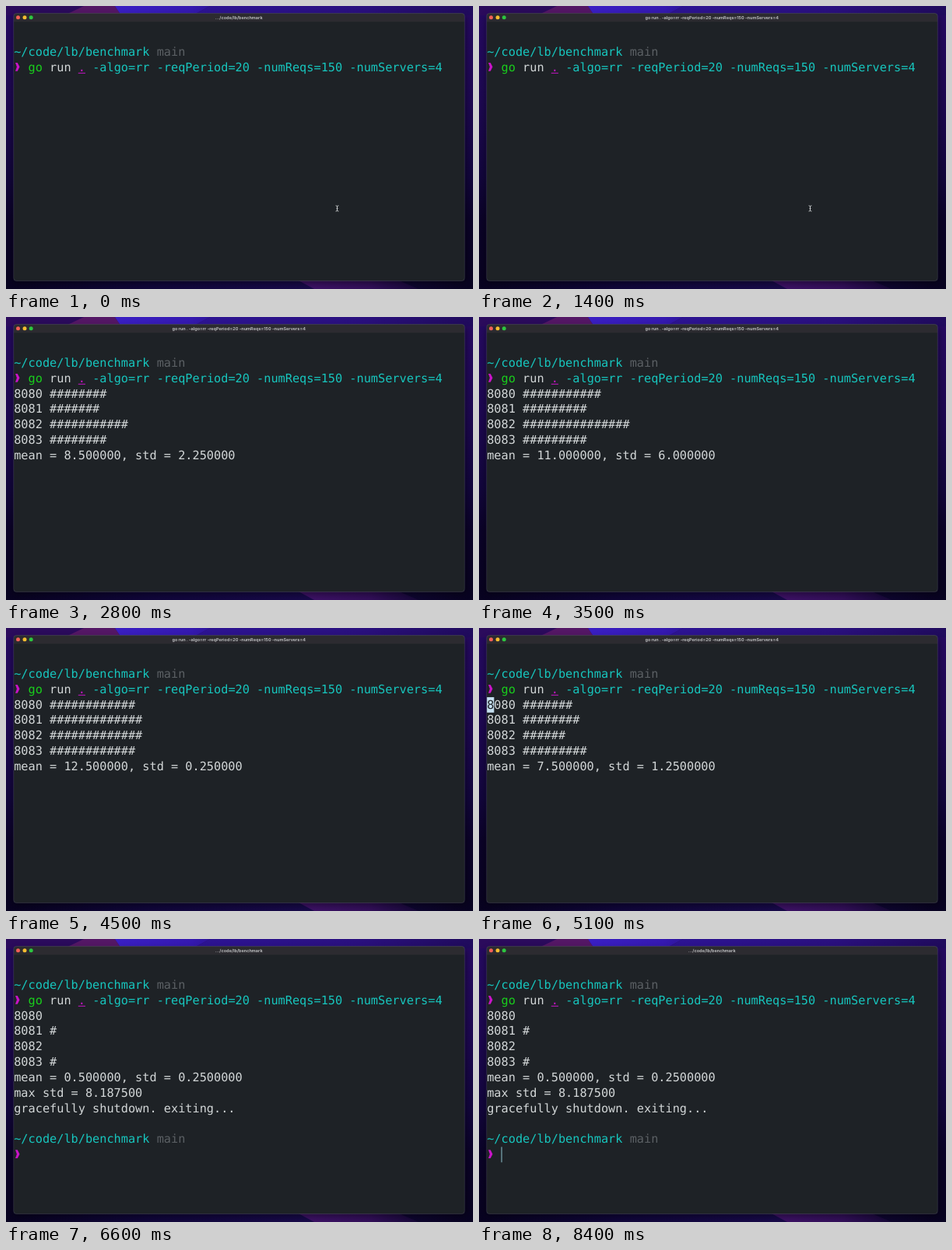
These frames come from a looping animation (600 px wide and 364 px high, 8500 ms). An HTML page:

```html
<!DOCTYPE html>
<html lang="en">
<head>
<meta charset="utf-8">
<title>Terminal</title>
<style>
  html, body { margin: 0; width: 100%; height: 100%; overflow: hidden; background: #0d0630; }
  svg { display: block; }
  text { white-space: pre; text-rendering: geometricPrecision; }
  .term { font: 15.24px "DejaVu Sans Mono", monospace; fill: #d3d7d8; }
  .bar { font: 700 5.5px Inter, sans-serif; fill: #b9babc; text-anchor: middle; }
  .term .cyan { fill: #17c6be; }
  .term .dim { fill: #5b6064; }
  .term .green { fill: #19cf1c; }
  .term .pink { fill: #c814c8; }
  .term .dark { fill: #1e2226; }
</style>
</head>
<body>
<svg id="stage" width="600" height="364" viewBox="0 0 600 364">
  <defs>
    <linearGradient id="sky" x1="0" y1="0" x2="0" y2="1">
      <stop offset="0" stop-color="#260a62"/>
      <stop offset=".35" stop-color="#1d0850"/>
      <stop offset=".6" stop-color="#12063c"/>
      <stop offset=".75" stop-color="#0b0328"/>
      <stop offset="1" stop-color="#08031f"/>
    </linearGradient>
    <linearGradient id="glow" x1="0" x2="1">
      <stop offset="0" stop-color="#3a1fc4"/>
      <stop offset=".8" stop-color="#3519b0"/>
      <stop offset="1" stop-color="#2f169c"/>
    </linearGradient>
    <linearGradient id="far" x1="0" x2="1">
      <stop offset="0" stop-color="#2d1494"/>
      <stop offset=".6" stop-color="#2a107e"/>
      <stop offset="1" stop-color="#200b5c"/>
    </linearGradient>
    <linearGradient id="floor" x1="0" x2="1">
      <stop offset="0" stop-color="#080320"/>
      <stop offset=".3" stop-color="#10063a"/>
      <stop offset=".65" stop-color="#180a4a"/>
      <stop offset="1" stop-color="#080320"/>
    </linearGradient>
    <linearGradient id="plum" x1="0" x2="1">
      <stop offset="0" stop-color="#3f1268"/>
      <stop offset=".6" stop-color="#330f5a"/>
      <stop offset="1" stop-color="#160838"/>
    </linearGradient>
    <filter id="blur" x="-10%" y="-10%" width="120%" height="120%">
      <feGaussianBlur stdDeviation="4"/>
    </filter>
    <clipPath id="frame"><rect x="10" y="9.5" width="579" height="344" rx="3.5"/></clipPath>
  </defs>
  <rect width="600" height="364" fill="url(#sky)"/>
  <path d="M0 0H100L75 12H0z" fill="#2b0b5c"/>
  <path d="M100 0H140L148 12H75z" fill="#541765"/>
  <path d="M140 0H262L240 12H148z" fill="url(#glow)"/>
  <path d="M262 0H600V12H240z" fill="url(#far)"/>
  <path d="M0 351H600V364H0z" fill="url(#floor)"/>
  <path d="M372 351H500L530 364H396z" fill="url(#plum)"/>
  <rect x="9" y="13" width="582" height="344" rx="5" opacity=".4" filter="url(#blur)"/>
  <g clip-path="url(#frame)">
    <rect x="10" y="9" width="579" height="345" fill="#1e2226"/>
    <rect x="10" y="9" width="579" height="11.3" fill="#2c2b30"/>
  </g>
  <rect x="9.7" y="9.4" width="579.6" height="344.2" rx="3.8" fill="none" stroke="#777a86" stroke-opacity=".42" stroke-width=".7"/>
  <circle cx="15.5" cy="14.7" r="2.5" fill="#f45f57"/>
  <circle cx="24" cy="14.7" r="2.5" fill="#f5bd30"/>
  <circle cx="32.2" cy="14.7" r="2.5" fill="#2cc640"/>
  <text id="title" class="bar" x="299.2" y="16.5"></text>
  <g id="term" class="term"></g>
  <path id="mouse" d="M423.6 256.8q1.9 0 1.9 1.1v5q0 1.1-1.9 1.1M427.4 256.8q-1.9 0-1.9 1.1v5q0 1.1 1.9 1.1M424.5 260.4h2" fill="none" stroke="#c9cccd" stroke-width=".9"/>
</svg>
<script>
const LOOP = 8500, BLINK = 500, TICK = 100;
const ENTER = 900, START = 1500, EXIT = 6400, HIDE_MOUSE = 2700;
const COL = 9.175, ROW = 19.83;
const FLAGS = '-algo=rr -reqPeriod=20 -numReqs=150 -numServers=4';
const IDLE = '.../code/lb/benchmark', BUSY = 'go run . ' + FLAGS;

// time, then open requests on each of the four servers
const LOAD = [
  [1500, 0, 0, 0, 0],
  [2000, 4, 7, 6, 6],
  [2800, 8, 7, 11, 8],
  [3500, 11, 9, 15, 9],
  [3800, 11, 8, 16, 12],
  [4500, 12, 13, 13, 12],
  [5100, 7, 8, 6, 9],
  [5700, 3, 3, 2, 5],
  [6300, 0, 1, 0, 1]
];

const byId = id => document.getElementById(id);
const term = byId('term'), title = byId('title'), mouse = byId('mouse');
const colX = c => 10.2 + c * COL;
const baseY = r => 64 + r * ROW;
const cellY = r => 49.3 + r * ROW;

function add(parent, tag, attrs) {
  const el = document.createElementNS('http://www.w3.org/2000/svg', tag);
  for (const k in attrs) el.setAttribute(k, attrs[k]);
  return parent.appendChild(el);
}

function write(parent, row, col, str, cls = '') {
  const el = add(parent, 'text', { x: colX(col), y: baseY(row), class: cls });
  el.textContent = str;
  return el;
}

function prompt(parent, row) {
  write(parent, row, 0, '~/code/lb/benchmark', 'cyan');
  write(parent, row, 20, 'main', 'dim');
  add(parent, 'path', {
    d: 'M12 0h2.8l2.7 5.3l-2.7 5.3h-2.8l1.9-5.3z',
    transform: `translate(0 ${baseY(row + 1) - 10.8})`, class: 'pink'
  });
}

const show = (el, on) => el.setAttribute('visibility', on ? 'visible' : 'hidden');
const setText = (el, s) => { if (el.textContent !== s) el.textContent = s; };

prompt(term, 0);
write(term, 1, 2, 'go', 'green');
write(term, 1, 5, 'run');
write(term, 1, 9, '.', 'pink');
add(term, 'rect', { x: colX(9), y: 85.8, width: COL, height: 1, class: 'pink' });
write(term, 1, 11, FLAGS, 'cyan');

const rows = [0, 1, 2, 3].map(i => write(term, 2 + i, 0, ''));
const stats = write(term, 6, 0, '');

const ending = add(term, 'g', {});
write(ending, 7, 0, 'max std = 8.187500');
write(ending, 8, 0, 'gracefully shutdown. exiting...');
prompt(ending, 10);

const beam = add(term, 'rect', { width: 1, height: ROW, fill: '#8fc4cf' });
const block = add(term, 'g', {});
add(block, 'rect', { x: colX(0), y: cellY(2), width: COL, height: ROW, fill: '#c5dff0' });
const under = write(block, 2, 0, '8', 'dark');

function loadAt(t) {
  const now = Math.floor(t / TICK) * TICK;
  const next = LOAD.findIndex(k => k[0] > now);
  if (next < 0) return LOAD[LOAD.length - 1].slice(1);
  const a = LOAD[next - 1], b = LOAD[next];
  const p = (now - a[0]) / (b[0] - a[0]);
  return a.slice(1).map((v, i) => Math.round(v + (b[i + 1] - v) * p));
}

function report(t) {
  if (t < START) {
    [...rows, stats].forEach(el => setText(el, ''));
    return;
  }
  const load = loadAt(t);
  const mean = load.reduce((s, v) => s + v) / 4;
  const std = load.reduce((s, v) => s + (v - mean) ** 2, 0) / 4;
  // a shorter line leaves the last digit of the longer one standing
  const rest = t > 4500 && mean < 10 ? '0' : '';
  rows.forEach((el, i) => setText(el, `${8080 + i} ${'#'.repeat(load[i])}`));
  setText(stats, `mean = ${mean.toFixed(6)}, std = ${std.toFixed(6)}${rest}`);
}

const lit = (t, from) => t >= from && Math.floor((t - from) / BLINK) % 2 === 0;

function draw(t) {
  const busy = t >= ENTER && t < EXIT, done = t >= EXIT;
  setText(title, busy ? BUSY : IDLE);
  report(t);
  show(ending, done);
  show(mouse, t < HIDE_MOUSE);
  beam.setAttribute('x', done ? colX(2) : colX(60) + .3);
  beam.setAttribute('y', cellY(done ? 11 : 1));
  show(beam, done ? lit(t, 7000) : !busy && lit(t, 200));
  show(block, busy && lit(t, ENTER));
  setText(under, t < START ? '' : '8');
}

const origin = performance.now();
function loop() {
  draw((performance.now() - origin) % LOOP);
  requestAnimationFrame(loop);
}
loop();
</script>
</body>
</html>
```
